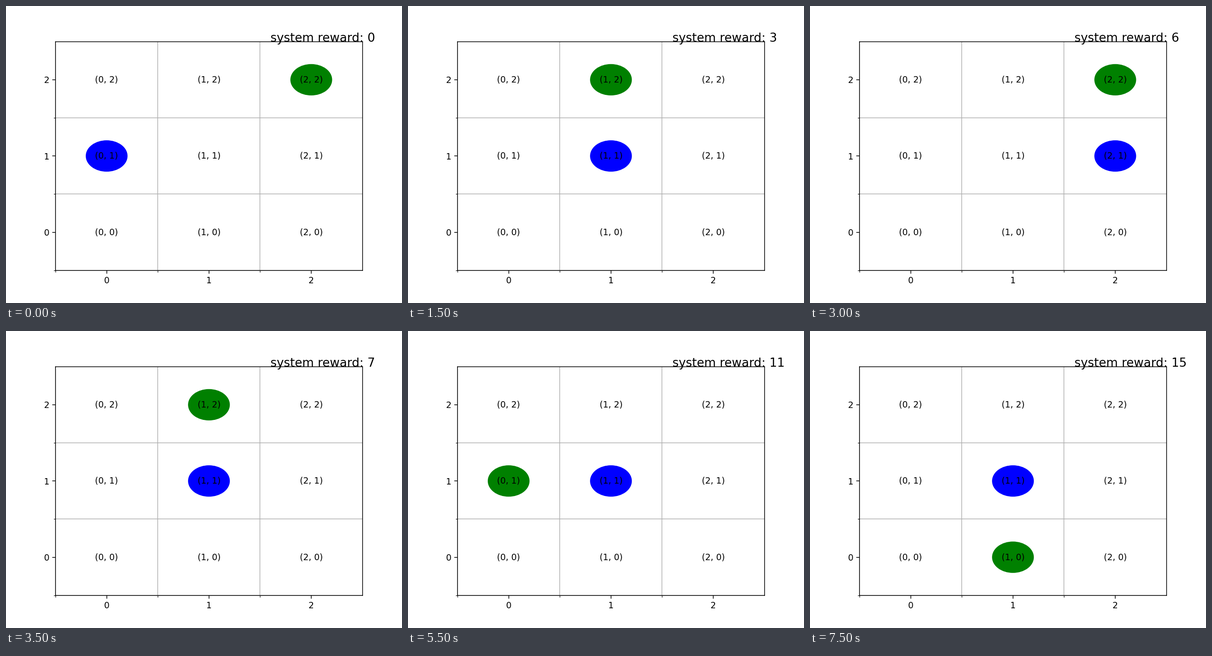
Animation of 864x648 px, one loop 8 s. Source, as a matplotlib script:

```python
import itertools

import matplotlib.pyplot as plt
import numpy as np
from matplotlib.animation import FuncAnimation
from matplotlib.patches import Circle

SIZE = 3
STEP_MS = 500

# Cells visited by each agent, one per step; the reward grows by one each step.
BLUE = [(0, 1)] + [(1, 1), (2, 1)] * 3 + [(1, 1), (0, 1)] * 4 + [(1, 1)]
GREEN = ([(2, 2)] + [(1, 2), (2, 2)] * 3 + [(1, 2), (0, 2)]
         + [(0, 1), (0, 2)] * 2 + [(0, 1), (0, 0), (1, 0)])

plt.rcParams["font.family"] = "DejaVu Sans"
fig, ax = plt.subplots(figsize=(6.4, 4.8), dpi=135)
ax.set_xlim(-0.5, SIZE - 0.5)
ax.set_ylim(-0.5, SIZE - 0.5)

cells = np.arange(SIZE)
for axis in (ax.xaxis, ax.yaxis):
    axis.set_ticks(cells)
    axis.set_ticks(cells - 0.5, minor=True)
ax.grid(which="minor")

for x, y in itertools.product(range(SIZE), repeat=2):
    ax.text(x, y, f"({x}, {y})", ha="center", va="center")


def add_agent(path, color):
    return ax.add_patch(Circle(path[0], 0.2, color=color))


agents = [(add_agent(BLUE, "blue"), BLUE), (add_agent(GREEN, "green"), GREEN)]
reward = ax.text(1.6, 2.5, "", fontsize=14)


def update(step):
    for disc, path in agents:
        disc.center = path[step]
    reward.set_text(f"system reward: {step}")
    return [disc for disc, _ in agents] + [reward]


anim = FuncAnimation(fig, update, frames=len(BLUE), interval=STEP_MS,
                     repeat=True, repeat_delay=0)
plt.show()
```
